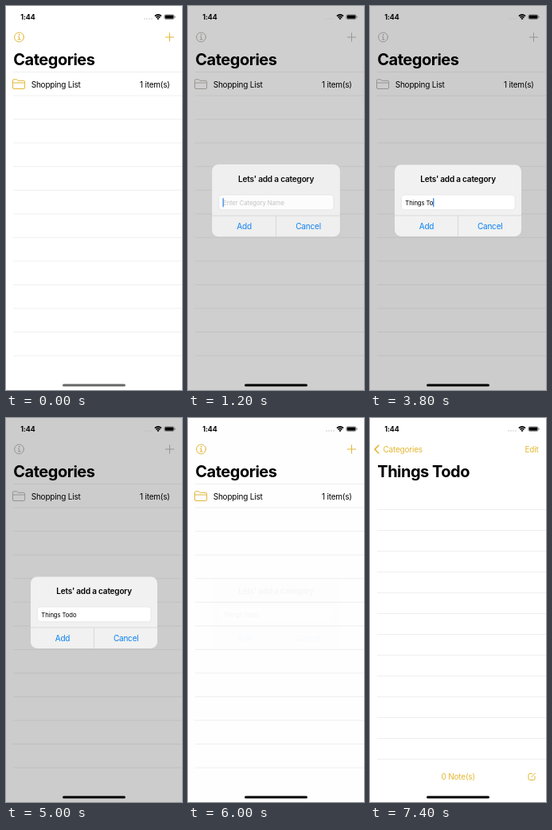
Animation, 221 px wide and 480 px high, one loop 8 s. Source, as an HTML page:

```html
<!DOCTYPE html>
<html lang="en">
<head>
<meta charset="utf-8">
<title>Categories</title>
<style>
  html, body { margin: 0; width: 100%; height: 100%; overflow: hidden; background: #fff; }
  svg { display: block; width: 100%; height: 100%; --tint: #e3b733; }
  text { font: 10px Inter, Roboto, sans-serif; letter-spacing: -.02em; white-space: pre; }
  .large { font-size: 20px; font-weight: 700; letter-spacing: -.025em; }
  .strong { font-weight: 600; }
  .clock { font-size: 8.8px; font-weight: 700; letter-spacing: -.01em; }
  .gold { fill: #e3b733; }
  .icon { fill: none; stroke: var(--tint); stroke-linecap: round; stroke-linejoin: round; }
  .blue { fill: #0a80f5; text-anchor: middle; }
  .field { font-size: 7.66px; letter-spacing: -.01em; }
  .end { text-anchor: end; }
  .rule { stroke: #e4e4e6; stroke-width: .6; fill: none; }
</style>
</head>
<body>
<svg viewBox="0 0 221 480">
  <defs>
    <path id="folder" d="M8.5 102V93.2q0-1.4 1.4-1.4h3.6l1.6 1.5h7q1.5 0 1.5 1.5v7.2q0 1.5-1.5 1.5H10q-1.5 0-1.5-1.5zM8.5 96h15"/>
  </defs>

  <g id="list">
    <rect width="221" height="480" fill="#fff"/>
    <rect id="selection" y="112" width="221" height="29.6" fill="#d1d1d6"/>
    <path id="listRules" class="rule"/>
    <use href="#folder" class="icon"/>
    <text x="31.7" y="101.5">Shopping List</text>
    <text x="205.8" y="101.5" class="end">1 item(s)</text>
    <g id="newRow" transform="translate(0 29.55)">
      <use href="#folder" class="icon"/>
      <text x="31.7" y="101.5">Things Todo</text>
      <text x="205.8" y="101.5" class="end">0 item(s)</text>
    </g>
  </g>
  <rect id="listShade" width="221" height="480"/>

  <g id="page">
    <rect width="221" height="480" fill="#fff"/>
    <path id="pageRules" class="rule"/>
    <text x="110.7" y="452" class="gold" text-anchor="middle">0 Note(s)</text>
    <path class="icon" d="M203.5 444.5h-3q-1.5 0-1.5 1.5v5q0 1.5 1.5 1.5h5q1.5 0 1.5-1.5v-3.2M202.5 449l5-5"/>
  </g>
  <text id="pageTitle" class="large" y="73.8">Things Todo</text>

  <g id="listButtons" class="icon">
    <circle cx="16.5" cy="39" r="5.9"/>
    <path d="M15.4 38.2h1.3v3.6M15.2 41.9h3"/>
    <circle cx="16.5" cy="35.9" r=".4"/>
    <path d="M200.3 39h10.4M205.5 33.8v10.4"/>
  </g>
  <text id="listTitle" class="large">Categories</text>
  <text id="backLabel" class="gold">Categories</text>
  <path id="chevron" class="icon" stroke-width="1.6" d="M10.8 34.2l-4.8 4.9 4.8 4.9"/>
  <text id="edit" x="211.5" y="42.7" class="gold end">Edit</text>

  <rect id="dim" width="221" height="480"/>
  <g id="alert">
    <rect x="31" y="198.4" width="159" height="89.5" rx="8" fill="#f0f1f0"/>
    <path id="pressed" d="M31 262h79.5v25.9H39q-8 0-8-8z" fill="#d8d8da"/>
    <text x="110.6" y="220" text-anchor="middle" class="strong">Lets' add a category</text>
    <rect x="39.4" y="236.1" width="142.8" height="18.6" rx="4" fill="#fff" stroke="#dcdcde" stroke-width=".6"/>
    <text id="placeholder" x="44.6" y="248.8" class="field" fill="#c2c2c5">Enter Category Name</text>
    <text id="entry" x="44.3" y="248.8" class="field"></text>
    <rect id="caret" y="240.2" width="1.2" height="11" fill="#2f7fe8"/>
    <path d="M31 261.9h159M110.5 261.9v26" stroke="#c9c9cc" stroke-width=".6"/>
    <text x="71" y="278.8" class="blue">Add</text>
    <text x="150.7" y="278.8" class="blue">Cancel</text>
  </g>

  <g id="status">
    <text x="18.3" y="17" class="clock">1:44</text>
    <path d="M174 16h10" stroke="#bbb" stroke-width="1.5" stroke-linecap="round" stroke-dasharray="0 3"/>
    <path d="M186.9 12.6q4.1-3.5 8.2 0M188.5 14.5q2.5-2.1 5 0" fill="none" stroke="#000" stroke-width="1.6"/>
    <path d="M189.4 15.7q1.6-1.2 3.2 0l-1.6 1.6z"/>
    <rect x="198.9" y="10.9" width="12.2" height="5.6" rx="1.7" fill="none" stroke="#666" stroke-width=".7"/>
    <rect x="199.6" y="11.6" width="10.8" height="4.2" rx="1"/>
    <path d="M212.1 12.7v2" stroke="#666" stroke-width=".9"/>
  </g>
  <rect id="homeBar" x="71" y="472.4" width="79" height="3" rx="1.5"/>
</svg>
<script>
const LOOP = 8000, STEP = 200, WIDTH = 221;
const el = Object.fromEntries([...document.querySelectorAll('[id]')].map(e => [e.id, e]));
const set = (e, attrs) => { for (const name in attrs) e.setAttribute(name, attrs[name]); };
const show = (e, on) => set(e, { visibility: on ? 'visible' : 'hidden' });
const mix = (a, b, p) => a + (b - a) * p;
const clamp = v => Math.max(0, Math.min(1, v));

// Critically damped spring from 0 to 1
const spring = (t, start, rate) => {
  const x = Math.max(0, t - start) * rate / 1000;
  return 1 - (1 + x) * Math.exp(-x);
};

const rules = (top, gap) =>
  Array.from({ length: 13 }, (_, i) => `M9 ${top + gap * i}H${WIDTH}`).join('');
set(el.listRules, { d: rules(82.5, 29.55) });
set(el.pageRules, { d: rules(114.5, 26) });

function typedCount(t) {
  if (t < 2000) return 0;
  if (t < 3400) return Math.min(6, (t - 2000) / STEP + 1);
  if (t < 4400) return Math.min(10, (t - 3400) / STEP + 7);
  return 11;
}

function drawAlert(t) {
  const shown = spring(t, 920, 17);
  const closed = spring(t, 5764, 23);
  const p = t < 1000 || t >= 6200 ? 0 : shown * (1 - closed);
  const scale = 1 + .2 * (1 - shown);
  set(el.dim, { opacity: .2 * p });
  set(el.alert, {
    opacity: p,
    transform: `translate(110.5 243) scale(${scale}) translate(-110.5 -243)`
  });
  document.querySelector('svg').style.setProperty(
    '--tint', `color-mix(in srgb, #b8b8b8 ${p * 100}%, #e3b733)`);

  const count = typedCount(t);
  el.entry.textContent = 'Things Todo'.slice(0, count);
  set(el.placeholder, { opacity: count ? 0 : 1 });
  set(el.caret, {
    x: 44.2 + (count ? el.entry.getComputedTextLength() : 0),
    opacity: t < 5000 ? 1 : 0
  });
  set(el.pressed, { opacity: t === 5400 ? 1 : t === 5600 ? .5 : 0 });
}

function drawPush(t) {
  const p = t >= 7400 ? 1 : spring(t, 6780, 12.8);
  const left = 1 - p;
  set(el.list, { transform: `translate(${-.3 * WIDTH * p} 0)` });
  set(el.listShade, { opacity: .1 * p });
  set(el.page, { transform: `translate(${WIDTH * left} 0)` });
  set(el.pageTitle, { x: 9.3 + 252 * left });
  set(el.listButtons, { opacity: left ** 1.5 });
  set(el.edit, { opacity: p });
  set(el.chevron, { opacity: clamp((p - .8) * 5) });

  // The large title shrinks into the back label
  const place = { x: mix(9.3, 16.5, p), y: mix(73.8, 42.7, p) };
  for (const label of [el.listTitle, el.backLabel]) {
    set(label, place);
    label.style.fontSize = mix(20, 10, p) + 'px';
  }
  el.listTitle.style.fill = `color-mix(in srgb, #e3ae45 ${clamp(p * 1.3) * 100}%, #000)`;
  set(el.listTitle, { opacity: clamp(left * 4) });
  set(el.backLabel, { opacity: p ** 6 });
}

function draw() {
  const t = Math.floor(performance.now() % LOOP / STEP) * STEP;
  show(el.newRow, t >= 6200);
  show(el.selection, t >= 6800);
  set(el.homeBar, { fill: t < 1000 ? '#666' : '#000' });
  drawAlert(t);
  drawPush(t);
  requestAnimationFrame(draw);
}
draw();
</script>
</body>
</html>
```
